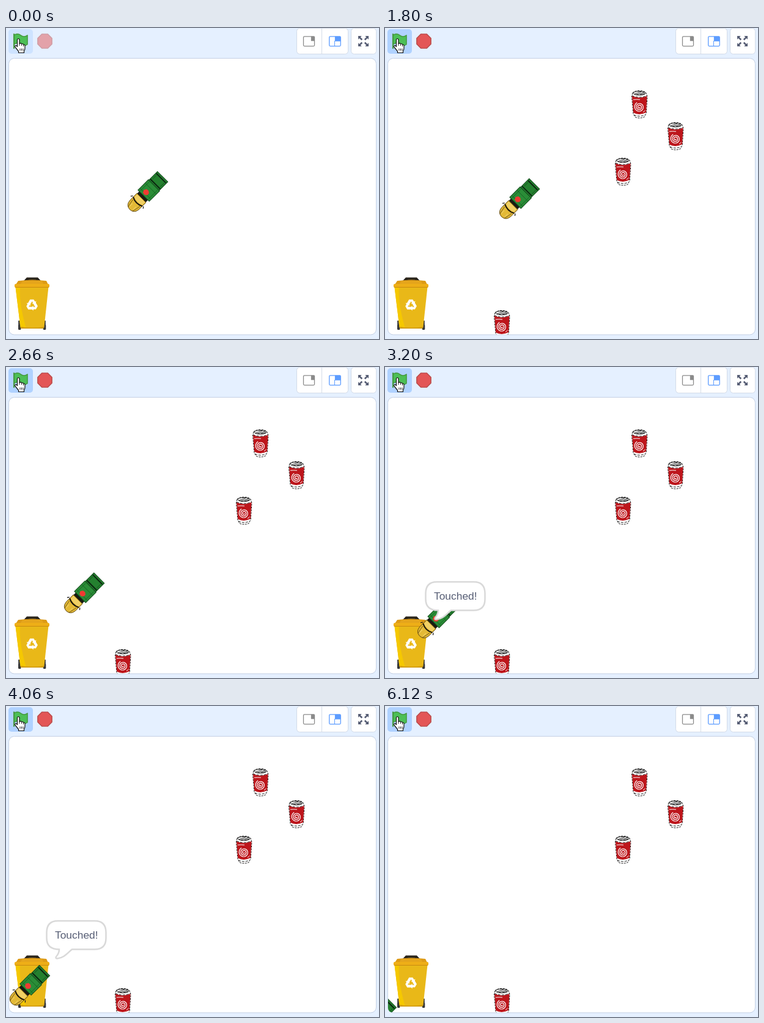
Animation of 610x508 px, one loop 6.72 s. Source, as an HTML page:

```html
<!DOCTYPE html>
<html lang="en">
<head>
<meta charset="utf-8">
<title>Recycling truck</title>
<style>
  html, body { margin: 0; height: 100%; overflow: hidden; background: #e5f0ff; }
  svg { display: block; width: 100%; height: 100%; }
</style>
</head>
<body>
<svg viewBox="0 0 610 508">
  <defs>
    <clipPath id="clip"><rect x="5" y="50" width="600" height="450.5" rx="7"/></clipPath>

    <g id="can">
      <path d="M-11-19Q-8-22.500 0-22.500Q8-22.500 11-19L13-13L11.200 14L8 20.500Q0 23.500-7 20.500L-10 15L-12.500-13z" fill="#fff" stroke="#1a1a1a" stroke-dasharray="3 1.500"/>
      <path d="M-12-14Q0-8.500 12.500-14L11 13Q0 18.500-9.800 13.500z" fill="#bd161c"/>
      <g fill="none" stroke="#1a1a1a">
        <ellipse cy="-18.500" rx="10" ry="3.200"/>
        <path d="M-8-17L3-21M-5-16L8-20M1-16L9-18"/>
        <path d="M-12-14.500Q0-9.500 12.500-14.500M-9 17Q0 21 9 17" stroke-dasharray="4 2"/>
      </g>
      <path class="swirl" fill="none" stroke="#fff" stroke-width="1.200"/>
      <path d="M-10-8Q-4-8.500 1-8M6 12.500Q8 11.500 9.500 9.500" fill="none" stroke="#fff"/>
    </g>

    <path id="arrow" d="M-6.500-3.300L-3.200-9H2.800L5-5.500L7-6.500L5.300-1L-.2-2.400L1.700-3.500L.2-6L-2.800-1.200z"/>
    <path id="corner" d="M-8.500-8.500H-2.800L-4.700-6.600L-1.300-3.200L-3.200-1.300L-6.600-4.700L-8.500-2.800z"/>
  </defs>

  <!-- toolbar -->
  <rect id="press" x="4" y="2" width="40" height="40" rx="5" fill="#4d97ff"/>
  <g transform="translate(12 9) scale(1.43)" fill="#4cbf56" stroke="#45993d" stroke-linecap="round" stroke-linejoin="round">
    <path d="M.75 2A6.440 6.440 0 0 1 8.440 2A6.440 6.440 0 0 0 16.130 2V12.400A6.440 6.440 0 0 1 8.440 12.400A6.440 6.440 0 0 0 .75 12.400"/>
    <path d="M.75 16.750V.75" stroke-width="1.5"/>
  </g>
  <path id="stop" transform="translate(51 9) scale(1.785)" d="M4.300.5H9.700L13.500 4.300V9.700L9.700 13.500H4.300L.5 9.700V4.300z" fill="#e35656" stroke="#b84848" stroke-width=".8"/>
  <g fill="#fff" stroke="#d3dbe8">
    <rect x="475.5" y=".5" width="84" height="42" rx="5"/>
    <path d="M516.500.5V42.500"/>
    <rect x="564.5" y=".5" width="41" height="42" rx="5"/>
  </g>
  <g fill="none" stroke="#8b8b8b" stroke-width="1.3">
    <rect x="486.500" y="13.800" width="18" height="15.800" rx="1.5"/>
    <path d="M499.500 14.500H504V20.500H499.500z" fill="#8b8b8b"/>
  </g>
  <g fill="none" stroke="#5c9cff" stroke-width="1.3">
    <rect x="528.700" y="13.800" width="18.500" height="15.800" rx="1.5"/>
    <path d="M538.500 14.500H546.500V21H538.500z" fill="#5c9cff"/>
    <path d="M537.500 21V29.500" stroke-width="1"/>
  </g>
  <g transform="translate(584.500 21.500)" fill="#575e75">
    <use href="#corner"/><use href="#corner" transform="rotate(90)"/>
    <use href="#corner" transform="rotate(180)"/><use href="#corner" transform="rotate(270)"/>
  </g>

  <!-- stage -->
  <rect x="4.500" y="49.500" width="601" height="451.500" rx="9" fill="#fff" stroke="#c4d0e4"/>
  <g clip-path="url(#clip)">
    <g id="cans"></g>

    <g id="bin">
      <path d="M21.500 478V490M63.500 478V490" stroke="#2d2d2d" stroke-width="2.500"/>
      <rect x="20" y="484.500" width="4.500" height="8.500" rx="1.500" fill="#383838"/>
      <rect x="60.800" y="484.500" width="4.500" height="8.500" rx="1.500" fill="#383838"/>
      <path d="M15.500 423H69.500L62.500 488Q62 491 59 491H27Q24 491 23.500 488z" fill="#e9b818"/>
      <path d="M15.500 423H23Q21 450 33 491H27Q24 491 23.500 488z" fill="#f5c800"/>
      <path d="M23.500 488Q24 491 27 491H59Q62 491 62.500 488Q43 491 23.500 488z" fill="#d29c12"/>
      <path d="M29 413L34 407.500H52L57 413z" fill="#28231a"/>
      <path d="M37 411H49" stroke="#51452b"/>
      <path d="M20 413Q43 410 66 413L69 419H16z" fill="#dc9a16"/>
      <path d="M27 413H59L61 418H24z" fill="#e5a51c"/>
      <rect x="14" y="418" width="57" height="6" rx="2" fill="#eeae17"/>
      <path d="M15 423.500H70" stroke="#c98b10"/>
      <g transform="translate(42.500 452.500)" fill="#fff">
        <use href="#arrow"/><use href="#arrow" transform="rotate(120)"/><use href="#arrow" transform="rotate(240)"/>
      </g>
    </g>

    <!-- drawn nose-right from the middle of the tail -->
    <g id="truck">
      <rect x="43" y="-10" width="8" height="20" fill="#171a12"/>
      <rect x=".5" y="-12" width="20" height="24" fill="#24802f" stroke="#11491a"/>
      <path d="M4 -11V11M17.500-11.500V11.500" stroke="#0b2610" stroke-width="2"/>
      <path d="M6-9H15M6 9H15" stroke="#165b20"/>
      <rect x="20.500" y="-13" width="24" height="26" fill="#2a8d37" stroke="#11491a"/>
      <path d="M22-9.500H43M22 9.500H43M28-12.500V12.500M40-12.500V12.500" stroke="#176323" stroke-width=".9"/>
      <path d="M60-14.500L57-12M60 14.500L57 12" stroke="#222" stroke-width="1.300"/>
      <path d="M49.500-10.500H66Q76-9.500 76.500 0Q76 9.500 66 10.500H49.500z" fill="#e3b936" stroke="#5c4510" stroke-width=".9"/>
      <path d="M50.500-9H57Q60 0 57 9H50.500z" fill="#f0d065"/>
      <path d="M58-10.500Q63.500 0 58 10.500" fill="none" stroke="#15130c" stroke-width="2"/>
      <path d="M61-8Q68-7 75-5M61 8Q68 7 75 5" fill="none" stroke="#6c5213" stroke-width=".9"/>
      <path d="M66-4H73M66 4H73" stroke="#f1d36a"/>
      <path d="M35.500-3.500L39.500-3.500L42.500 0L41.500 4.500L37.500 6.500L33.500 4L33 0z" fill="#f03a32"/>
    </g>

    <g id="bubble">
      <path d="M85 351H145Q163.500 351 163.500 370V379Q163.500 397.500 145 397.500H108C101 403 95 411.500 84 412.500Q80.500 412.500 82 409.500Q87 404 87 397.500Q66.500 397.500 66.500 379V370Q66.500 351 85 351z" fill="#fff" stroke="#d9d9d9" stroke-width="2.500"/>
      <text x="80" y="380" font-family="'Liberation Sans', Arial, sans-serif" font-size="17.4" fill="#575e75">Touched!</text>
    </g>
  </g>

  <!-- pointer -->
  <g stroke="#111" stroke-linejoin="round">
    <path d="M18.500 19.500Q18.500 17.500 20.200 17.500Q22 17.500 22 19.500V25.500Q25 24 25.500 26.200Q28 25 28.500 27.200Q31 26.500 31 29.500V33Q31 35.500 29.500 37.500V40.500H20.500V38L15.200 31.500Q14 29.500 15.500 28.800Q17 28.300 18.500 30.500z" fill="#fff" stroke-width="1.200"/>
    <path d="M22 25.500V29M25.500 26.500V29M28.500 27.500V30M23 33.500V37M25.500 33.500V37M28 33.500V37" stroke-width=".9"/>
  </g>
</svg>
<script>
const LOOP = 6720, PRESS = 1000, START = 1690, TOUCH = 2895, HUSH = 6120;
const FAST = 0.107, SLOW = 0.055, LIMIT = 246;
const el = id => document.getElementById(id);
const show = (node, on) => node.setAttribute('visibility', on ? 'visible' : 'hidden');

// Spiral on the can label
let swirl = '';
for (let a = 0; a < 17; a += 0.4) {
  const r = 1 + a * 0.43;
  swirl += (a ? 'L' : 'M') + (r * Math.cos(a)).toFixed(1) + ' ' + (4 + r * Math.sin(a)).toFixed(1);
}
document.querySelector('.swirl').setAttribute('d', swirl);

el('cans').innerHTML = [[416, 125], [475, 177], [389, 235], [191, 484]]
  .map(([x, y]) => `<use href="#can" x="${x}" y="${y}"/>`).join('');
const cans = [...el('cans').children];

// The truck slows to half speed once it touches the bin
function distance(t) {
  const fast = Math.max(0, Math.min(t, TOUCH) - START) * FAST;
  const slow = Math.max(0, t - TOUCH) * SLOW;
  return Math.min(LIMIT, fast + slow);
}

function draw() {
  const t = performance.now() % LOOP;
  const running = t >= PRESS;
  const d = distance(t);
  el('press').setAttribute('opacity', running ? 0.35 : 0.15);
  el('stop').setAttribute('opacity', running ? 1 : 0.5);
  cans.forEach((can, i) => show(can, t >= PRESS + 130 * (i + 1)));
  el('truck').setAttribute('transform', `translate(${256.5 - d} ${242.5 + d * 0.98}) rotate(135)`);
  show(el('bubble'), t >= TOUCH && t < HUSH);
  requestAnimationFrame(draw);
}
draw();
</script>
</body>
</html>
```
